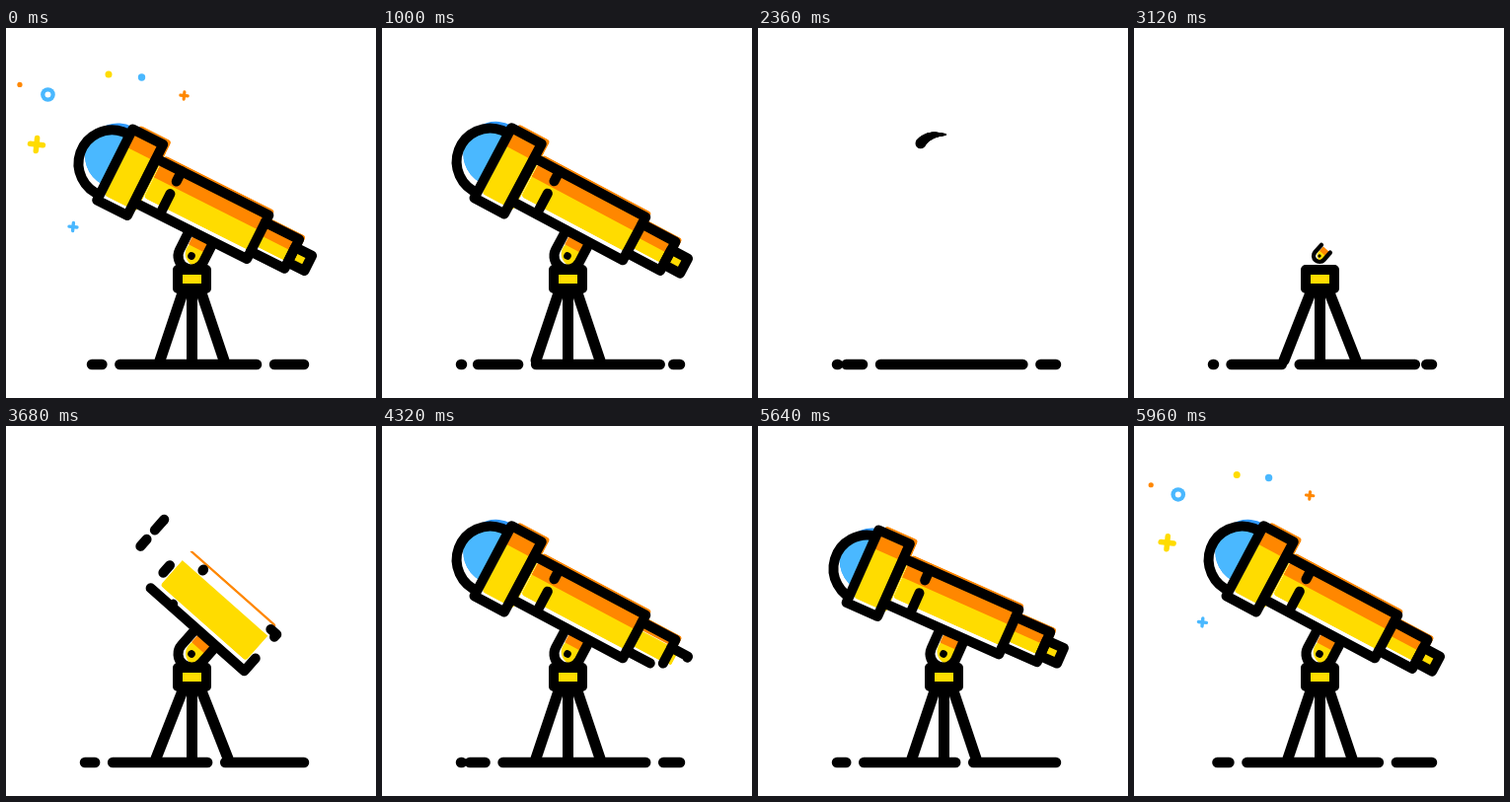
An HTML page with a canvas for the animation above (6 s loop, 375 by 375 pixels).

```html
<!DOCTYPE html>
<html lang="en">
<head>
<meta charset="utf-8">
<title>Telescope</title>
<style>
html, body { margin: 0; width: 100%; height: 100%; overflow: hidden; background: #fff; }
canvas { display: block; width: 375px; height: 375px; }
</style>
</head>
<body>
<canvas id="stage"></canvas>
<script>
const LOOP = 6000;
const INK = '#000', YELLOW = '#ffdc00', ORANGE = '#ff8700', BLUE = '#4ab8ff', DEEP = '#2f98fb';
const canvas = document.getElementById('stage');
const ctx = canvas.getContext('2d');
const dpr = window.devicePixelRatio || 1;
canvas.width = canvas.height = 375 * dpr;

const clamp = v => Math.max(0, Math.min(1, v));
const mix = (a, b, p) => a + (b - a) * p;
const ramp = (t, a, b) => clamp((t - a) / (b - a));
const smooth = p => p * p * (3 - 2 * p);
const hump = (t, a, b, c, d) => smooth(ramp(t, a, b)) * (1 - smooth(ramp(t, c, d)));

// Parts leave in the reverse order of their arrival, at a quicker pace
const leave = time => 1040 + (4480 - time) * 0.42;
const shown = (t, from, to) => t < 2300 ? 1 - ramp(t, leave(to), leave(from)) : ramp(t, from, to);

function stroke(width = 10, color = INK) {
  ctx.lineWidth = width;
  ctx.strokeStyle = color;
  ctx.stroke();
}

function line(points, width, color) {
  ctx.beginPath();
  points.forEach(([x, y]) => ctx.lineTo(x, y));
  stroke(width, color);
}

function disc(x, y, r, color) {
  ctx.fillStyle = color;
  ctx.beginPath();
  ctx.arc(x, y, r, 0, 7);
  ctx.fill();
}

// Outline growing from several seeds: [seed, low, high, progress], measured along the path
function outline(points, pieces) {
  if (pieces.every(piece => piece[3] >= 1)) return line(points);
  for (const [seed, low, high, p] of pieces) {
    const a = mix(seed, low, p), b = mix(seed, high, p);
    if (b - a < 0.1) continue;
    ctx.setLineDash([b - a, 2000]);
    ctx.lineDashOffset = -a;
    line(points);
  }
  ctx.setLineDash([]);
}

const box = (x0, y0, x1, y1) => [[x0, y1], [x1, y1], [x1, y0], [x0, y0], [x0, y1], [x0 + 1, y1]];

// Yellow body wiped in from the left, orange shade sinking from the top
function paint(x0, x1, top, split, bottom, p, shade) {
  if (p <= 0) return;
  const w = (x1 - x0) * p;
  ctx.save();
  ctx.beginPath();
  ctx.roundRect(x0, top, w, bottom - top, 4);
  ctx.clip();
  ctx.fillStyle = YELLOW;
  ctx.fillRect(x0, top + 14, w, bottom - top - 14);
  ctx.fillStyle = ORANGE;
  ctx.fillRect(x0, top, w, (split - top) * shade);
  ctx.restore();
}

// Key points of a gap crossing the ground: [age, x]
const PATH = [[-320, 62], [0, 83], [1320, 91], [2340, 114], [3000, 147], [3680, 213],
  [4000, 263], [4340, 277], [5320, 294], [5680, 311]];

function gapX(age) {
  let i = 0;
  while (i < PATH.length - 2 && age > PATH[i + 1][0]) i++;
  const [[t0, x0], [t1, x1]] = PATH.slice(i, i + 2);
  return mix(x0, x1, ramp(age, t0, t1));
}

function ground(t) {
  const dip = 16 * Math.sin(Math.PI * ramp(t, 2540, 2640));
  const dash = (a, b) => {
    if (b <= a) return;
    const points = [];
    const steps = Math.ceil((b - a) / 4);
    for (let i = 0; i <= steps; i++) {
      const x = mix(a, b, i / steps);
      points.push([x, 341 + dip * Math.exp(-(((x - 121) / 24) ** 2))]);
    }
    line(points, 10.5);
  };
  let from = 80;
  for (let k = -1; k < 3; k++) {
    const x = gapX(t % 2000 + k * 2000);
    const half = Math.min(9, Math.max(x - 81, 4), Math.max(0, (302 - x) / 2));
    if (x + half < 80 || x > 302) continue;
    dash(from, x - half);
    from = x + half;
  }
  dash(from, 302);
}

function ball(t) {
  if (t < 1960 || t > 2560) return;
  for (let i = 0; i <= 46; i++) {
    const d = Math.max(1960, t - i * 2.5) - 2260;
    disc(187 - 0.22 * d, 108 + 233 * Math.abs(d / 300) ** 3, mix(5.3, 1, i / 46), INK);
  }
}

function tripod(t) {
  const legs = smooth(shown(t, 2640, 2960));
  if (legs > 0) {
    const reach = 32.5 + 4 * hump(t, 2600, 2640, 3680, 3880);
    for (const side of [-1, 0, 1]) {
      const top = 188.5 + side * 9, foot = 188.5 + side * reach;
      line([[foot, 337], [mix(foot, top, legs), mix(337, 267, legs)]], 11);
    }
  }
  const base = smooth(shown(t, 2860, 3060));
  if (base > 0) {
    ctx.save();
    ctx.translate(188.5, 264);
    ctx.scale(base, base);
    ctx.fillStyle = YELLOW;
    ctx.fillRect(-10, -17, 20, 13);
    line(box(-14.5, -19, 14.5, 0));
    ctx.restore();
  }
}

function mount(t) {
  const p = smooth(shown(t, 3020, 3240));
  if (p <= 0) return;
  const bracket = new Path2D();
  bracket.moveTo(13.5, -22);
  bracket.arc(0, 0, 13.5, 0, Math.PI);
  bracket.lineTo(-13.5, -22);
  ctx.save();
  ctx.scale(p, p);
  ctx.fillStyle = '#fff';
  ctx.fill(bracket);
  ctx.save();
  ctx.clip(bracket);
  disc(5, -5, 13, YELLOW);
  ctx.fillStyle = ORANGE;
  ctx.fillRect(-8, -26, 26, 17);
  ctx.restore();
  ctx.lineWidth = 10;
  ctx.strokeStyle = INK;
  ctx.stroke(bracket);
  disc(0, 0, 3.8, INK);
  ctx.restore();
}

function lens(t, pull) {
  const glass = smooth(shown(t, 3940, 4180));
  const rim = 1.7 * smooth(shown(t, 3880, 4160));
  ctx.save();
  ctx.beginPath();
  ctx.rect(-180, -120, 72, 140);
  ctx.clip();
  ctx.translate(9 * pull, 0);
  if (glass > 0) {
    ctx.save();
    disc(-112.5, -57, 33 * glass, DEEP);
    ctx.clip();
    disc(-112.5, -46, 33 * glass, BLUE);
    ctx.restore();
  }
  if (rim > 0) {
    ctx.beginPath();
    ctx.arc(-114, -47.5, 34, Math.PI - rim, Math.PI + rim);
    stroke();
  }
  ctx.restore();
}

const TUBE = box(-76, -72, 51.5, -22.5);
const BLOCK = [[-76.5, -7.5], [-111, -7.5], [-111, -88], [-76.5, -88], [-76.5, -7.5], [-77.5, -7.5]];
const NECK = [[51.5, -64], [90, -64], [90, -31], [51.5, -31]];
const EYE = [[90, -55], [109, -55], [109, -38], [90, -38], [90, -55]];

function scope(t, pull) {
  const long = shown(t, 3440, 3700);
  const short = shown(t, 3660, 3880);
  const block = shown(t, 3650, 3960);
  const neck = shown(t, 3980, 4360);
  const eye = shown(t, 4260, 4480);

  lens(t, pull);
  paint(-70, 55, -79, -54, -31, long, short);
  paint(54, 95, -70, -50, -38, shown(t, 3980, 4180), shown(t, 4160, 4400));
  paint(94, 109, -69, -69, -39, eye, 0);
  paint(-106.5, -70, -95, -69, -15, shown(t, 3740, 3960), shown(t, 3860, 4040));

  outline(TUBE, [[75, -5, 150, long], [177, 141, 260, short], [331, 255, 360, short]]);
  if (short > 0) {
    line([[-47.5, -72], [-47.5, mix(-72, -60.5, short)]]);
    line([[-47.5, -23], [-47.5, mix(-23, -46.5, short)]]);
  }
  outline(BLOCK, [[83, -2, 92, block], [97, 91, 233, block]]);
  outline(NECK, [[0, 0, 73, neck], [110, 70, 110, shown(t, 4200, 4380)]]);
  outline(EYE, [[0, 0, 73, eye]]);
}

function sparks(t) {
  const u = t < 3000 ? t + LOOP : t;
  const reach = 1.12 * (1 - Math.exp((5643 - u) / 160));
  const size = ramp(u, 5640, 5880) * (1 - ramp(u, 6280, 6560));
  if (size <= 0) return;
  const at = (x, y, draw) => {
    ctx.save();
    ctx.translate(110 + (x - 110) * reach, 125 + (y - 125) * reach);
    ctx.scale(size, size);
    draw();
    ctx.restore();
  };
  const dot = (x, y, r, color) => at(x, y, () => disc(0, 0, r, color));
  const plus = (x, y, arm, color) => at(x, y, () => {
    ctx.rotate(0.1);
    line([[-arm, 0], [arm, 0]], arm * 0.85, color);
    line([[0, -arm], [0, arm]], arm * 0.85, color);
  });
  dot(14, 57.5, 2.6, ORANGE);
  dot(104, 47, 3.5, YELLOW);
  dot(137.5, 50, 3.7, BLUE);
  dot(42.5, 67.5, 7.3, BLUE);
  dot(42.5, 67.5, 3, '#fff');
  plus(31, 118, 6.5, YELLOW);
  plus(180.5, 68.5, 3.7, ORANGE);
  plus(68, 201.5, 4, BLUE);
}

function draw(t) {
  ctx.setTransform(dpr, 0, 0, dpr, 0, 0);
  ctx.fillStyle = '#fff';
  ctx.fillRect(0, 0, 375, 375);
  ctx.lineCap = ctx.lineJoin = 'round';
  ground(t);
  tripod(t);
  ball(t);

  const tilt = hump(t, 1900, 2600, 3680, 3920);
  const pull = hump(t, 4560, 5320, 5600, 5800);
  const recoil = 1 - smooth(ramp(t, 0, 1000));
  ctx.save();
  ctx.translate(188, 231);
  ctx.rotate((28 + 13.5 * tilt - 4.5 * pull - 1.3 * recoil) * Math.PI / 180);
  mount(t);
  scope(t, pull);
  ctx.restore();
  sparks(t);
}

const start = performance.now();
function frame() {
  draw((performance.now() - start) % LOOP);
  requestAnimationFrame(frame);
}
draw(0);
requestAnimationFrame(frame);
</script>
</body>
</html>
```
